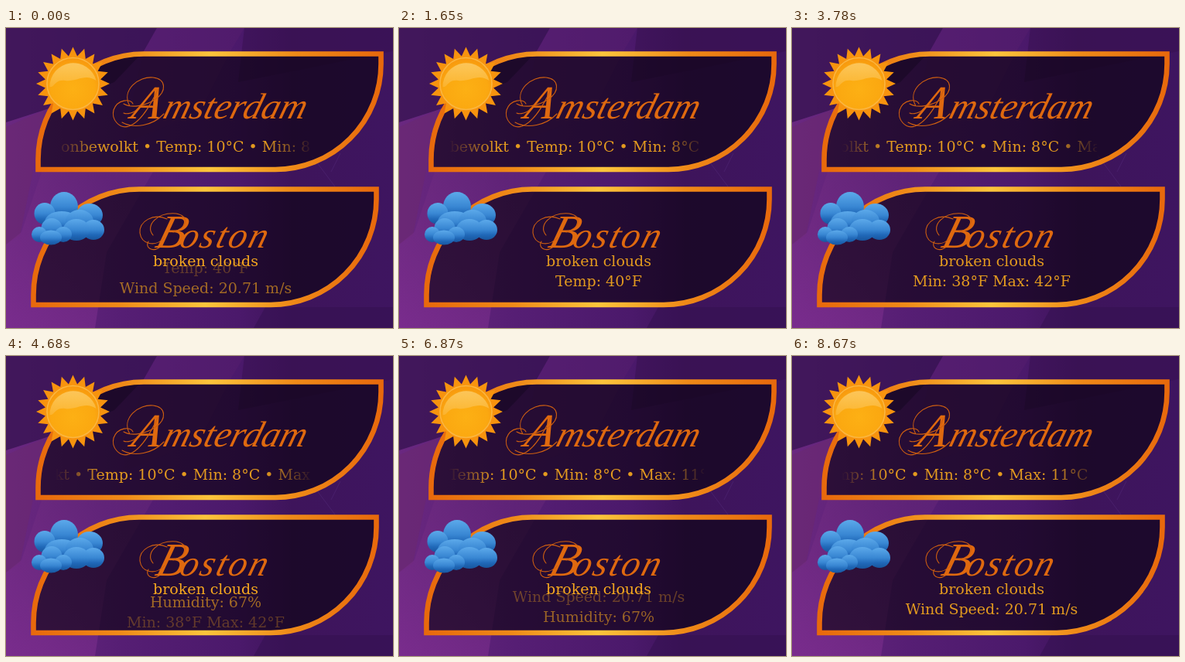
An HTML page for the animation above (8.7 s loop, 500 by 388 pixels).

```html
<!DOCTYPE html>
<html lang="en">
<head>
<meta charset="utf-8">
<title>Weather cards</title>
<style>
  html, body { margin: 0; width: 100%; height: 100%; overflow: hidden; background: #441663; }
  svg { display: block; width: 500px; height: 388px; }
  .info { font-family: "DejaVu Serif", "Noto Serif", serif; fill: #e39a1f; white-space: pre; }
  .mid { text-anchor: middle; }
  .title { font: italic 47px "Liberation Serif", "Times New Roman", serif; fill: #df690f; }
  .cap { font-size: 61px; }
  .swash { fill: none; stroke: #cf5f10; stroke-width: 1.1; stroke-linecap: round; }
</style>
</head>
<body>
<svg viewBox="0 0 500 388" xmlns="http://www.w3.org/2000/svg">
  <defs>
    <linearGradient id="sky">
      <stop offset="0" stop-color="#6a2880"/>
      <stop offset=".3" stop-color="#561e74"/>
      <stop offset=".6" stop-color="#4b196b"/>
      <stop offset=".74" stop-color="#3e145b"/>
      <stop offset="1" stop-color="#3e1560"/>
    </linearGradient>
    <linearGradient id="glow" x1="0" y1="1" x2=".6" y2="0">
      <stop offset="0" stop-color="#7d2d90"/>
      <stop offset="1" stop-color="#6c2a7c" stop-opacity=".5"/>
    </linearGradient>
    <linearGradient id="gold">
      <stop offset="0" stop-color="#e8690c"/>
      <stop offset=".25" stop-color="#ef8a18"/>
      <stop offset=".5" stop-color="#fcc53c"/>
      <stop offset=".75" stop-color="#ef8a18"/>
      <stop offset="1" stop-color="#e8690c"/>
    </linearGradient>
    <radialGradient id="disc" cx=".5" cy=".6" r=".6">
      <stop offset="0" stop-color="#fdb014"/>
      <stop offset=".7" stop-color="#fba810"/>
      <stop offset="1" stop-color="#f7960e"/>
    </radialGradient>
    <linearGradient id="shine" x2="0" y2="1">
      <stop offset="0" stop-color="#fdd479"/>
      <stop offset="1" stop-color="#fbb83a"/>
    </linearGradient>
    <linearGradient id="puff" x2="0" y2="1">
      <stop offset="0" stop-color="#5ca9ea"/>
      <stop offset=".5" stop-color="#3987d3"/>
      <stop offset=".75" stop-color="#2068b8"/>
      <stop offset="1" stop-color="#18569e"/>
    </linearGradient>
    <linearGradient id="fade" gradientUnits="userSpaceOnUse" x1="64" x2="394">
      <stop offset="0" stop-color="#fff" stop-opacity="0"/>
      <stop offset=".18" stop-color="#fff"/>
      <stop offset=".82" stop-color="#fff"/>
      <stop offset="1" stop-color="#fff" stop-opacity=".06"/>
    </linearGradient>
    <mask id="window" maskUnits="userSpaceOnUse" x="64" y="135" width="330" height="40">
      <rect x="64" y="135" width="330" height="40" fill="url(#fade)"/>
    </mask>
  </defs>

  <rect width="500" height="388" fill="url(#sky)"/>
  <path d="M0 0H195L178 30 140 70 50 106 0 122Z" fill="#35124f" opacity=".75"/>
  <path d="M195 0H308L290 30 250 110 150 150 178 30Z" fill="#571f6e" opacity=".5"/>
  <path d="M308 0H500V30L300 70Z" fill="#37114f" opacity=".5"/>
  <path d="M0 128L50 106 34 190 18 268 0 280Z" fill="#6b2870" opacity=".6"/>
  <path d="M0 280L20 264 46 186H190L130 290 115 388H0Z" fill="url(#glow)" opacity=".8"/>
  <path d="M335 361H500V388H320Z" fill="#33104f" opacity=".5"/>
  <path d="M395 165L425 205M420 186L432 162" stroke="#5a3182" stroke-width=".7" opacity=".6"/>

  <g id="cards"></g>
  <g id="sun"></g>
  <g id="clouds"></g>

  <text class="title" transform="translate(160 117) skewX(-16)"><tspan class="cap" x="0">A</tspan><tspan x="41">msterdam</tspan></text>
  <g class="swash">
    <path d="M196 80C186 101 174 122 159 127 146 131 136 118 139 106 144 92 161 91 164 98"/>
    <path d="M152 110C156 112 166 110 170 104M160 101C148 80 172 62 190 64 207 66 208 82 193 92 180 101 162 104 152 98"/>
    <path d="M150 122C166 131 190 126 204 111"/>
  </g>
  <text class="title" transform="translate(191 284) skewX(-16)"><tspan class="cap" x="0">B</tspan><tspan x="31" letter-spacing="2.6">oston</tspan></text>
  <g class="swash">
    <path d="M208 247C190 239 172 250 173 265 175 280 193 284 205 271"/>
    <path d="M190 268C179 255 196 238 220 240 237 243 235 258 216 264"/>
    <path d="M198 284C189 290 179 284 184 276"/>
  </g>

  <g mask="url(#window)">
    <text id="marquee" class="info" y="160">onbewolkt • Temp: 10°C • Min: 8°C • Max: 11°C</text>
  </g>
  <text id="leaving" class="info mid" x="258"></text>
  <text id="entering" class="info mid" x="258"></text>
  <text id="sky-state" class="info mid" x="258" y="308">broken clouds</text>
</svg>
<script>
const LOOP = 8700;
const byId = id => document.getElementById(id);

function leaf(x, y) {
  const w = 443, h = 149.5, r = 136.5;
  return `<path d="M${x} ${y + h}V${y + r}A${r} ${r} 0 0 1 ${x + r} ${y}H${x + w}V${y + h - r}` +
    `A${r} ${r} 0 0 1 ${x + w - r} ${y + h}Z" fill="#0b0210" fill-opacity=".62" stroke="url(#gold)" stroke-width="6.6"/>`;
}

function sunMarkup(cx, cy, rays) {
  const points = Array.from({ length: rays * 2 }, (_, i) => {
    const radius = i % 2 ? 36 : 47.5, angle = i * Math.PI / rays - Math.PI / 2;
    return `${(cx + radius * Math.cos(angle)).toFixed(1)},${(cy + radius * Math.sin(angle)).toFixed(1)}`;
  }).join(' ');
  return `<polygon points="${points}" fill="#f7930e"/>` +
    `<circle cx="${cx}" cy="${cy}" r="33.5" fill="url(#disc)" stroke="#fbb640" stroke-width="1.6"/>` +
    `<path d="M${cx - 30} ${cy + 4}A30.5 30.5 0 0 1 ${cx + 30} ${cy - 4}C${cx + 16} ${cy - 14} ${cx + 4} ${cy - 2} ${cx - 10} ${cy - 4}` +
    `S${cx - 24} ${cy + 6} ${cx - 30} ${cy + 4}Z" fill="url(#shine)" opacity=".7"/>`;
}

// Puffs run from back to front; each is light on top and dark below.
const cloudMarkup = puffs => puffs.map(([x, y, rx, ry]) =>
  `<ellipse cx="${x}" cy="${y}" rx="${rx}" ry="${ry}" fill="url(#puff)"/>`).join('');

byId('cards').innerHTML = leaf(41.5, 33.5) + leaf(35.5, 208.5);
byId('sun').innerHTML = sunMarkup(86.5, 72, 20);
byId('clouds').innerHTML = cloudMarkup([
  [75, 231, 18, 19], [50, 240, 13.5, 14], [108, 242, 17, 15], [72, 251, 22, 14], [95, 250, 18, 15],
  [113, 261, 14, 13], [91, 261, 17, 14],
  [59, 259, 13.5, 13], [43, 267, 10, 10], [74, 267, 11, 10], [58, 271, 14, 9.5]
]);

// The fallback serif runs narrower, so it is set one size larger.
const pen = document.createElement('canvas').getContext('2d');
const widthIn = family => {
  pen.font = `40px ${family}`;
  return pen.measureText('Wind Speed').width;
};
const fontSize = widthIn('"DejaVu Serif", monospace') !== widthIn('monospace') ? 19 : 20;
document.querySelectorAll('.info').forEach(el => el.setAttribute('font-size', fontSize));

const scrollKeys = [[0, 0], [1650, 29], [3780, 72], [4680, 89], [6030, 115], [7620, 143], [LOOP, 160.3]];
function scrolled(t) {
  const i = scrollKeys.findIndex(([time]) => time > t);
  const [t0, d0] = scrollKeys[i - 1], [t1, d1] = scrollKeys[i];
  return d0 + (d1 - d0) * (t - t0) / (t1 - t0);
}

const facts = ['Wind Speed: 20.71 m/s', 'Temp: 40°F', 'Min: 38°F Max: 42°F', 'Humidity: 67%'];
const STEP = 2285, SLIDE = 500, LEAD = 195, TRAVEL = 26, REST = 334;

function place(id, text, y, opacity) {
  const el = byId(id);
  el.textContent = text;
  el.setAttribute('y', y.toFixed(2));
  el.setAttribute('opacity', opacity.toFixed(3));
}

function render(t) {
  byId('marquee').setAttribute('x', 71 - Math.round(scrolled(t)));

  const clock = t + LEAD;
  const index = Math.floor(clock / STEP);
  const phase = Math.min(1, (clock % STEP) / SLIDE);
  const p = (1 - Math.cos(Math.PI * phase)) / 2;
  place('leaving', facts[index % 4], REST + TRAVEL * p, 1 - p);
  place('entering', facts[(index + 1) % 4], REST - TRAVEL * (1 - p), p);
  byId('sky-state').style.fill = phase < 1 ? '#f6a81f' : '#e39a1f';
}

const start = performance.now();
function tick() {
  render((performance.now() - start) % LOOP);
  requestAnimationFrame(tick);
}
tick();
</script>
</body>
</html>
```
